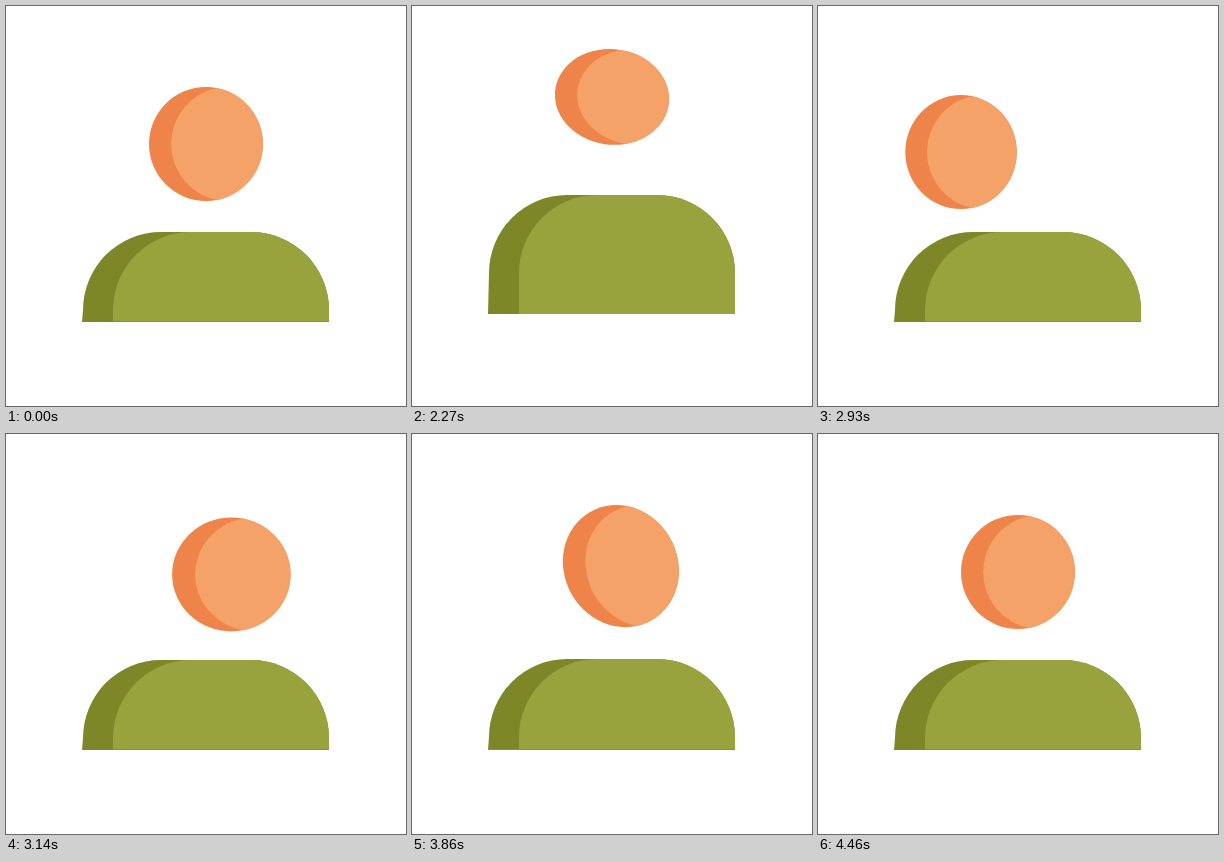
Animation of 400x400 px, one loop 4.55 s. Source, as an HTML page:

```html
<!DOCTYPE html>
<html lang="en">
<head>
<meta charset="utf-8">
<title>Hopping user</title>
<style>
  html, body { margin: 0; width: 100%; height: 100%; overflow: hidden; background: #fff; }
  svg { display: block; width: 100%; height: 100%; }
</style>
</head>
<body>
<svg viewBox="0 0 400 400">
  <path id="shade" fill="#7d8728"/>
  <path id="torso" fill="#99a33d"/>
  <path id="base" d="M76 315.5H323" stroke="#7d8728" stroke-opacity=".6"/>
  <g id="head">
    <circle r="57" fill="#ee8449"/>
    <path d="M11-55.9A57 57 0 0 1 11 55.9A57 57 0 0 1 11-55.9Z" fill="#f4a268"/>
  </g>
</svg>
<script>
const LOOP = 4550, STEP = 30, PHASE = 20, HOP_TIME = 510;
const el = id => document.getElementById(id);

// Progress from 0 to 1 between two times
const span = (t, from, to) => Math.min(1, Math.max(0, (t - from) / (to - from)));
const quadIn = u => u * u;
const cubicOut = u => 1 - (1 - u) ** 3;
const cubicInOut = u => u < .5 ? 4 * u ** 3 : 1 - 4 * (1 - u) ** 3;
const sineInOut = u => (1 - Math.cos(Math.PI * u)) / 2;
const bump = u => Math.sin(Math.PI * u);

// Jump to the left, slide to the right, jump back to the middle
function headMatrix(t) {
  const rise = cubicOut(span(t, 2003, 2210));
  const fall = quadIn(span(t, 2210, 2450));
  const slide = span(t, 2900, 3230);
  const swing = span(t, 3230, 3350);
  const crouch = sineInOut(span(t, 3530, 3720));
  const leap = span(t, 3720, 4085);
  const drop = quadIn(span(t, 4085, 4325));
  const settle = bump(span(t, 4325, 4460));

  const x = 200
    - 59 * cubicInOut(span(t, 2270, 2720))
    + 102 * sineInOut(slide) - 11 * sineInOut(swing)
    - 32 * cubicInOut(span(t, 3530, 4090));
  const y = 138
    - 51 * rise + 62.5 * fall
    - 12 * bump(slide) + 4 * bump(swing)
    + 3 * crouch - 63.5 * sineInOut(leap) + 49 * drop + 4 * settle;

  const lift = Math.max(0, rise - fall + sineInOut(leap) - drop);
  const stretch = bump(leap);
  const sx = 1 - .04 * bump(2 * slide) + .016 * stretch;
  const sy = 1 - .175 * lift ** 1.5 + .11 * stretch;
  const skew = .045 * lift + .07 * stretch;
  return `matrix(${[sx, 0, skew, sy, x, y].map(n => n.toFixed(4)).join(" ")})`;
}

const hop = t => bump(span(t, 2004, 2004 + HOP_TIME)) + bump(span(t, 3856, 3856 + HOP_TIME));

function shoulders(foot, left, top, bottom) {
  const r = 78;
  return `M${foot} ${bottom}L${left} ${top + r}A${r} ${r} 0 0 1 ${left + r} ${top}` +
    `H${323 - r}A${r} ${r} 0 0 1 323 ${top + r}V${bottom}Z`;
}

function draw(time) {
  const t = Math.floor((time % LOOP - PHASE) / STEP) * STEP + PHASE;
  const h = hop(t), top = 226 - 37 * h, bottom = 316 - 8 * h;
  el("head").setAttribute("transform", headMatrix(t));
  el("shade").setAttribute("d", shoulders(76, 77, top, bottom));
  el("torso").setAttribute("d", shoulders(107, 107, top, bottom));
  el("base").style.display = h > .1 ? "none" : "";
}

const begin = performance.now();
function tick() {
  draw(performance.now() - begin);
  requestAnimationFrame(tick);
}
tick();
</script>
</body>
</html>
```
